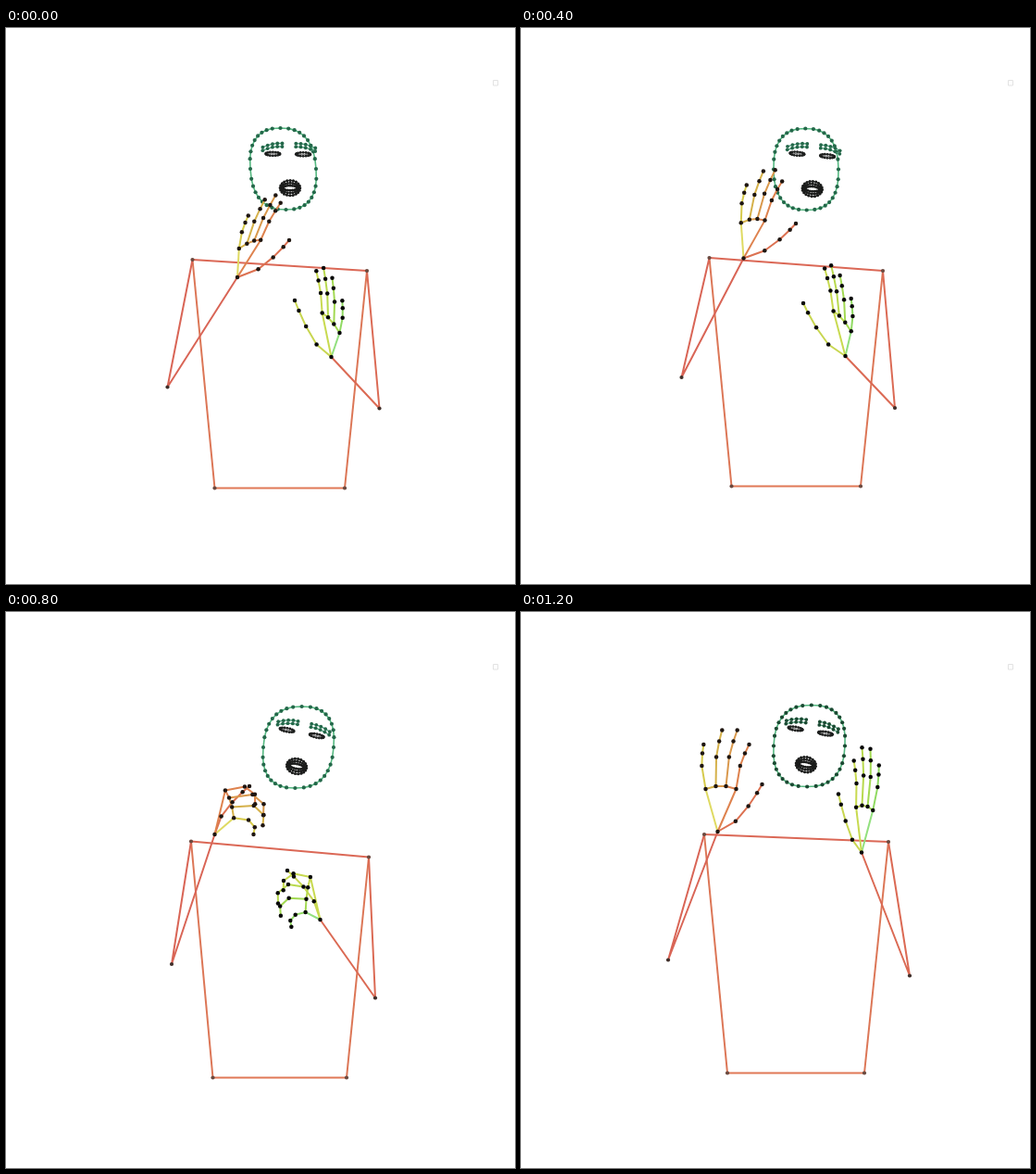
These frames come from a looping animation (550x600 px, 1.28 s). An HTML page with a canvas:

```html
<!DOCTYPE html>
<html lang="en">
<head>
<meta charset="utf-8">
<title>Signing figure</title>
<style>
html, body { margin: 0; width: 100%; height: 100%; overflow: hidden; background: #fff; }
canvas { display: block; }
</style>
</head>
<body>
<canvas id="stage" width="550" height="600"></canvas>
<script>
const ctx = document.getElementById('stage').getContext('2d');
const LOOP = 1280, STEP = 80;
const times = [0, 400, 560, 800, 1200];

// One entry per key time; pairs are right x, y, left x, y
const shoulders = [[201.5, 250, 390, 262], [203.5, 248, 391, 262], [202, 245, 393.5, 261],
  [200, 247.5, 392, 264.5], [198, 240, 397, 248]];
const elbows = [[174.5, 387.5, 403.5, 410.5], [173.5, 377, 404, 410], [173, 369, 405, 412.5],
  [179, 380, 399, 416.5], [159, 375.5, 420, 392.5]];
const wrists = [[250, 269, 351.5, 355], [240.5, 248.5, 350.5, 354], [224, 229.5, 341, 352.5],
  [225.5, 240, 339.5, 332], [212.5, 237, 368, 259.5]];
// Hips: right x, left x, y
const hips = [[225.5, 366, 496.5], [227.5, 367, 494.5], [226.5, 369, 497.5],
  [223.5, 368, 502.5], [223, 371, 497.5]];
// Head: centre, half width, tilt, sideways turn
const head = [[299.5, 152, 35.5, .015, 5], [308, 152.5, 35, .08, 5.5], [311, 149.5, 37, .09, 4],
  [316, 146, 38, .195, .6], [311.5, 144.5, 38.5, .16, -1.3]];
// Hand: axis across the palm, axis along it, thumb tip from the wrist, curl
const right = [[.71, -.28, .24, -.753, 56, -40, 0], [.78, -.08, .161, -.854, 56.5, -37.5, 0],
  [.76, -.19, .147, -.848, 54, -41.5, 0], [-.28, -.9, .37, -.64, 37.5, -52, 1],
  [1, 0, 0, -1, 48, -51, 0]];
const left = [[-.57, -.65, .034, -.751, -39.5, -61, 0], [-.58, -.66, -.028, -.766, -45.5, -57, 0],
  [-.42, -.73, -.22, -.643, -46, -54.5, 0], [.16, -1.15, -.3, -.5, -35.5, -53, 1],
  [-.55, -.1, .111, -1.016, -25, -63, 0]];

const rightColors = ['#dc7151', '#de824e', '#d9984c', '#d5b14a', '#d6ca4c', '#dfda62'];
const leftColors = ['#c8d650', '#c8da50', '#b8d94e', '#a2d952', '#90da62', '#92e07e'];

// Linear between keys; the last move slows to a stop
function at(track, t) {
  let k = 0;
  while (k < times.length - 2 && t >= times[k + 1]) k++;
  let u = (t - times[k]) / (times[k + 1] - times[k]);
  if (k === times.length - 2) u = 1 - (1 - u) ** 2;
  return track[k].map((v, i) => v + u * (track[k + 1][i] - v));
}

const range = (n, f) => Array.from({ length: n }, (_, i) => f(i));
const mix = (a, b, u) => a + (b - a) * u;

function line(points, color, width = 2, closed = false) {
  ctx.beginPath();
  points.forEach(p => ctx.lineTo(...p));
  if (closed) ctx.closePath();
  ctx.strokeStyle = color;
  ctx.lineWidth = width;
  ctx.stroke();
}

function dots(points, color, r) {
  ctx.fillStyle = color;
  for (const [x, y] of points) {
    ctx.beginPath();
    ctx.arc(x, y, r, 0, 7);
    ctx.fill();
  }
}

function rotate([x, y], angle) {
  const c = Math.cos(angle), s = Math.sin(angle);
  return [x * c - y * s, x * s + y * c];
}

// Superellipse; power 1 is a plain ellipse, less is squarer
function ring(n, rx, ry, power = 1) {
  const bend = v => Math.sign(v) * Math.abs(v) ** power;
  return range(n, i => {
    const a = i / n * 2 * Math.PI;
    return [rx * bend(Math.cos(a)), ry * bend(Math.sin(a))];
  });
}

function drawFace(t) {
  const [cx, cy, half, tilt, turn] = at(head, t);
  const fade = Math.max(0, (t - 800) / 400);
  const green = `rgb(${mix(36, 26, fade)},${mix(104, 74, fade)},${mix(74, 50, fade)})`;

  const outline = ring(36, 1, 1, .8).map(([x, y]) =>
    [cx + half * (x + (.1 - tilt) * y), cy + 44 * y]);
  line(outline, '#54b880', 1.6, true);
  dots(outline, green, 2.1);

  const place = (points, ox, oy) => points.map(([x, y]) => {
    const [px, py] = rotate([x + ox, y + oy], tilt);
    return [cx + px, cy + py];
  });

  for (const side of [-1, 1]) {
    const ex = turn + side * 16.4;
    const lid = place(ring(16, 7.8, 2), ex, -16);
    line(lid, '#444', 1.2, true);
    line(place([[-6, 0], [6, 0]], ex, -16), '#777', 1);
    dots(lid, '#1d1f1e', 1.4);

    // Two arched rows, lower at the outer end
    for (const row of [0, 1]) {
      const brow = place(range(5, i => {
        const u = i / 4;
        return [side * (11 - 21 * u), row * 3.5 - 7 - 10 * u + 5.5 * u * u];
      }), ex + Math.max(0, side * 2), -16);
      line(brow, '#52a480', 1.3);
      dots(brow, green, 1.9);
    }
  }

  for (const [rx, ry] of [[10.8, 8.2], [9.5, 5.4], [8, 2.6]]) {
    const lip = place(ring(20, rx, ry), turn * 1.3 + 1.3, 20.5);
    line(lip, '#333', 1.4, true);
    dots(lip, '#1b1c1b', 1.5);
  }
}

function drawHand(track, [wx, wy], side, colors, dot, t) {
  const [ax, ay, bx, by, tx, ty, curl] = at(track, t);
  const palm = (u, v) => [u * ax + v * bx, u * ay + v * by];

  const thumb = [.22, .54, .82, 1].map(p =>
    [wx + tx * p ** (.6 + .5 * curl), wy + ty * p ** (1 - .35 * curl)]);

  // Index to little finger: the middle two sit higher and reach further
  const fingers = range(4, i => {
    const arch = i % 3 ? 1 : 0;
    const lean = 14 - 1.8 * i * i, reach = 48 + 12.5 * arch;
    const [kx, ky] = palm(20 - 11 * i, 46 + 3 * arch);
    const joint = f => palm(lean * f - 3 * Math.sin(Math.PI * f), reach * f);
    const chain = [[wx + kx, wy + ky]];
    [0, .52, .8, 1].reduce((from, to, k) => {
      const [x0, y0] = joint(from), [x1, y1] = joint(to);
      const [dx, dy] = rotate([x1 - x0, y1 - y0], side * curl * (.05 + .95 * k));
      const [px, py] = chain[chain.length - 1];
      chain.push([px + dx, py + dy]);
      return to;
    });
    return chain;
  });

  const wrist = [wx, wy];
  line([wrist, fingers[3][0]], colors[5]);
  line([wrist, ...thumb], colors[0]);
  line([wrist, fingers[0][0]], colors[1]);
  fingers.forEach((chain, i) => {
    if (i) line([fingers[i - 1][0], chain[0]], colors[i]);
    line(chain, colors[i + 1]);
  });
  dots([wrist, ...thumb, ...fingers.flat()], dot, 2.25);
}

function draw(t) {
  ctx.fillStyle = '#fff';
  ctx.fillRect(0, 0, 550, 600);
  ctx.lineJoin = 'round';
  ctx.strokeStyle = '#e2e2e2';
  ctx.lineWidth = 1;
  ctx.strokeRect(526.5, 56.5, 5, 5.5);

  const pair = track => {
    const [a, b, c, d] = at(track, t);
    return [[a, b], [c, d]];
  };
  const [shR, shL] = pair(shoulders), [elR, elL] = pair(elbows), [wrR, wrL] = pair(wrists);
  const [hipRx, hipLx, hipY] = at(hips, t);
  const hipR = [hipRx, hipY], hipL = [hipLx, hipY];

  line([shR, hipR], '#dc7656');
  line([shL, hipL], '#dc7656');
  line([hipR, hipL], '#e07856');
  line([shR, shL], '#db6856');
  line([shR, elR, wrR], '#d96556');
  line([shL, elL, wrL], '#db6a54');
  dots([shR, shL, hipR, hipL], '#6b4a40', 2.1);
  dots([elR, elL], '#40302b', 2.1);
  drawFace(t);
  drawHand(right, wrR, 1, rightColors, '#1f1611', t);
  drawHand(left, wrL, -1, leftColors, '#080808', t);
}

function tick() {
  draw(Math.floor(performance.now() % LOOP / STEP) * STEP);
  requestAnimationFrame(tick);
}
tick();
</script>
</body>
</html>
```
